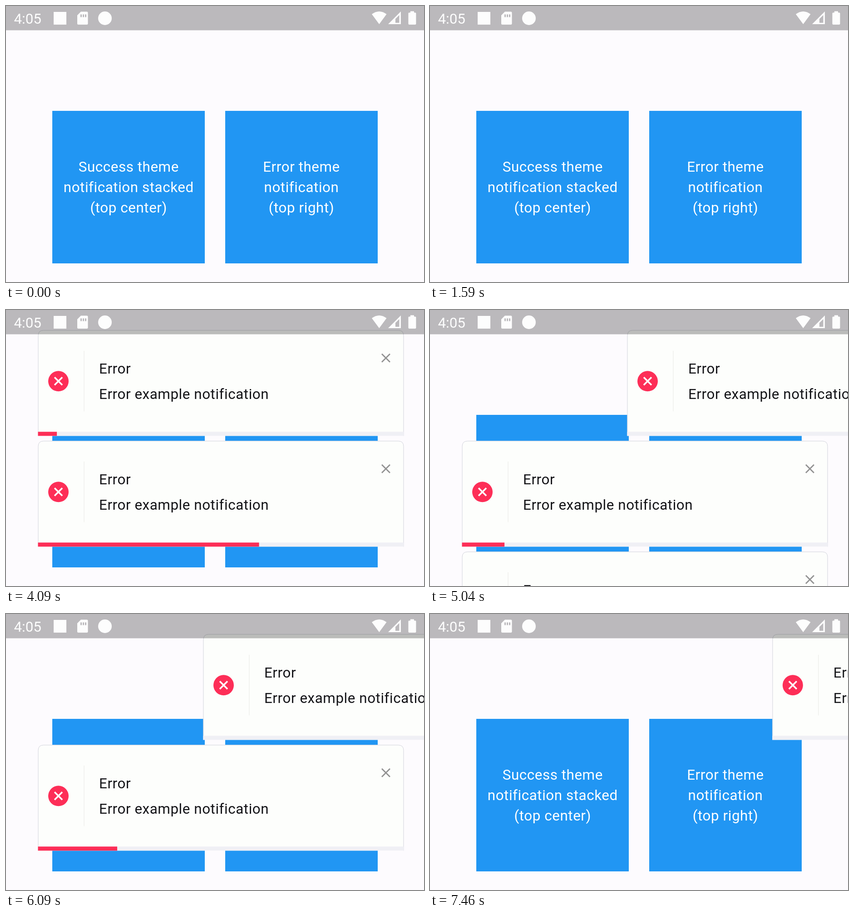
These frames come from a looping animation (921 by 608 pixels, 7.5 s). An HTML page:

```html
<!DOCTYPE html>
<html lang="en">
<head>
<meta charset="utf-8">
<style>
  html, body { margin: 0; width: 100%; height: 100%; overflow: hidden; background: #fdfbfe; }
  svg { display: block; width: 921px; height: 608px; }
  text { font: 31.36px Roboto, sans-serif; letter-spacing: .56px; }
  .button rect { fill: #2196f3; }
  .button text { fill: #fff; text-anchor: middle; }
  .card { fill: #141418; }
</style>
</head>
<body>
<svg viewBox="0 0 921 608">
  <defs>
    <g id="card" class="card">
      <path d="M0 233V12Q0 0 12 0H794Q806 0 806 12V233Z" fill="#fdfefc"/>
      <path d="M.5 233V12Q.5 .5 12 .5H794Q805.5 .5 805.5 12V233" fill="none" stroke="#d2d2dc"/>
      <path d="M101.5 46V179" stroke="#deded8" stroke-dasharray="2 1"/>
      <circle cx="45" cy="112.5" r="22.5" fill="#fd2e57"/>
      <path d="M36.5 104l17 17m0-17l-17 17" stroke="#fff" stroke-width="3.6"/>
      <path d="M757.5 52.5l18 18m0-18l-18 18" stroke="#929292" stroke-width="2.8"/>
      <text x="134.5" y="95.7">Error</text>
      <text x="134.5" y="151.8">Error example notification</text>
      <rect y="224" width="806" height="9" fill="#f0f0f5"/>
      <rect class="bar" y="224" height="9" fill="#fd2e57"/>
    </g>
  </defs>

  <g class="button">
    <rect x="102" y="231" width="336" height="336"/>
    <text x="270.3" y="365">Success theme</text>
    <text x="270.3" y="409.8">notification stacked</text>
    <text x="270.3" y="454.6">(top center)</text>
  </g>
  <g class="button">
    <rect x="483" y="231" width="336" height="336"/>
    <text x="651" y="365">Error theme</text>
    <text x="651" y="409.8">notification</text>
    <text x="651" y="454.6">(top right)</text>
  </g>

  <g id="cards"></g>

  <rect width="921" height="53.5" opacity=".262"/>
  <g fill="#fdfdfd">
    <text x="17.5" y="39" style="letter-spacing:0">4:05</text>
    <rect x="105" y="13" width="28" height="28"/>
    <path fill-rule="evenodd" d="M165 12.5H178q2.5 0 2.5 2.5V38.5q0 2.5-2.5 2.5H159.5q-2.5 0-2.5-2.5V20.5ZM164 18.5v6h3v-6ZM169 18.5v6h3v-6ZM174 18.5v6h3v-6Z"/>
    <circle cx="218" cy="27" r="15"/>
    <path d="M822.3 40L806 18Q822.3 6 838.5 18Z"/>
    <path fill-rule="evenodd" d="M842 40L870 12V40ZM858 28.5V37H866.5V20Z"/>
    <path d="M891 11.5h8v3h2.5q2 0 2 2V39q0 2-2 2H888.5q-2 0-2-2V16.5q0-2 2-2H891Z"/>
  </g>
</svg>

<script>
const LOOP = 7500, SLIDE = 600, SHIFT = 400, STEP = 244;
const clamp = v => Math.min(1, Math.max(0, v));

// cubic-bezier(.25, .1, .25, 1)
function ease(x) {
  x = clamp(x);
  let lo = 0, hi = 1;
  for (let i = 0; i < 24; i++) {
    const m = (lo + hi) / 2, n = 1 - m;
    if (.75 * m * n + m * m * m < x) lo = m; else hi = m;
  }
  return .3 * lo * (1 - lo) ** 2 + 3 * lo * lo * (1 - lo) + lo ** 3;
}

// start and end of each countdown, then the moment the card leaves
const template = document.getElementById('card');
const cards = [[2014, 4204, 4651], [3321, 5267, 5701], [4488, 6534, 6971]]
  .map(([start, end, leave], slot) => {
    const el = template.cloneNode(true);
    el.removeAttribute('id');
    document.getElementById('cards').append(el);
    return { el, bar: el.querySelector('.bar'), slot, start, end, enter: start - 120, leave };
  });

function draw(t) {
  for (const c of cards) {
    const shown = t >= c.enter && t < c.leave + SLIDE;
    c.el.setAttribute('display', shown ? 'inline' : 'none');
    if (!shown) continue;
    const place = t < c.leave ? (t - c.enter) / SLIDE : 1 - (t - c.leave) / SLIDE;
    let row = c.slot;
    for (const above of cards.slice(0, c.slot))
      row -= ease((t - above.leave - SLIDE) / SHIFT);
    const x = 70.5 + 921 * (1 - ease(place)), y = 44.3 + STEP * row;
    c.el.setAttribute('transform', `translate(${x} ${y})`);
    c.bar.setAttribute('width', 806 * (1 - clamp((t - c.start) / (c.end - c.start))));
  }
}

const begin = performance.now();
function tick() {
  draw((performance.now() - begin) % LOOP);
  requestAnimationFrame(tick);
}
tick();
</script>
</body>
</html>
```
